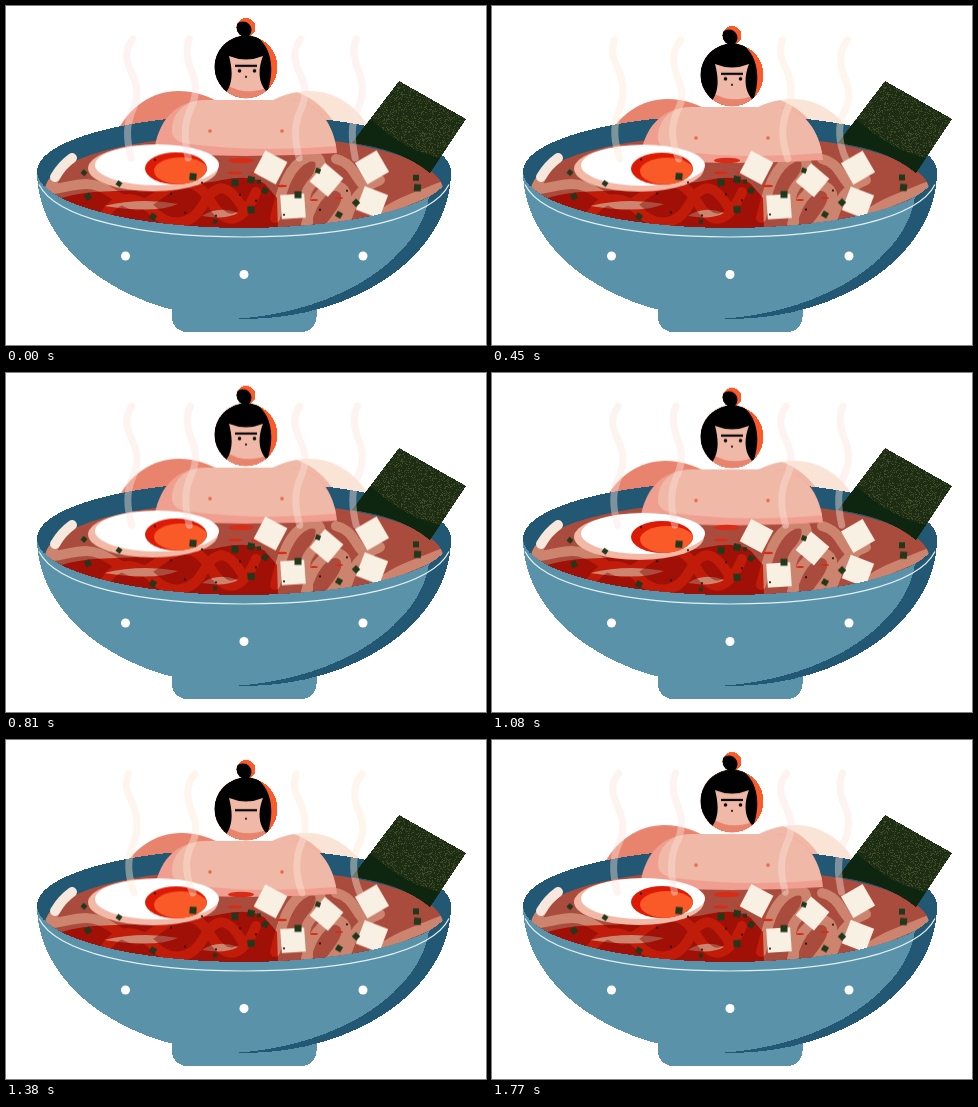
An HTML page that plays this animation: 480x339 px, repeating every 1800 ms.

```html
<!DOCTYPE html>
<html lang="en">
<head>
<meta charset="utf-8">
<title>Ramen bath</title>
<style>
html, body { margin: 0; width: 100%; height: 100%; overflow: hidden; background: #fff; }
svg { display: block; width: 100vw; height: 100vh; }
.crisp { shape-rendering: crispEdges; }
.oil { mix-blend-mode: multiply; }

.bob { animation: bob 900ms cubic-bezier(.37, 0, .63, 1) infinite; }
.chest { --y: 7px; }
.head { --y: 8px; }
.arm { --x: 3px; --y: 8px; }
.float { --y: 3px; animation-delay: -210ms; }
.crumb { --y: 1.2px; animation-delay: -250ms; }
@keyframes bob { 50% { transform: translate(var(--x, 0px), var(--y)); } }

.brow { animation: brow 1800ms infinite; }
.eyes { animation: blink 1800ms step-end infinite; }
@keyframes brow { 0%, 72% { transform: none; } 75%, 78% { transform: translateY(2.5px); } 81%, 100% { transform: none; } }
@keyframes blink { 0% { opacity: 1; } 74% { opacity: 0; } 79% { opacity: 1; } }

.steam path {
  fill: none; stroke-width: 7; stroke-linecap: round; stroke-opacity: .42;
  animation: 900ms cubic-bezier(.37, 0, .63, 1) -840ms infinite;
}
.steam .a { animation-name: swayA; }
.steam .b { animation-name: swayB; }
@keyframes swayA {
  0%, 100% { stroke: #fae2df; d: path("M127 33C119 43 119 52 125 66C132 80 133 90 127 103C120 118 120 132 125 152"); }
  50% { stroke: #fde6d4; d: path("M122 34C119 46 120 50 126 62C133 78 133 92 126 107C121 122 122 135 128 153"); }
}
@keyframes swayB {
  0%, 100% { stroke: #fae2df; d: path("M183 33C179 43 181 54 186 66C192 80 190 92 184 104C178 118 178 132 182 152"); }
  50% { stroke: #fde6d4; d: path("M189 34C180 44 180 56 185 70C191 84 192 93 185 106C179 119 179 135 187 153"); }
}
</style>
</head>
<body>
<svg viewBox="0 0 480 339" preserveAspectRatio="none">
  <defs>
    <clipPath id="rim"><ellipse cx="238" cy="165.500" rx="207" ry="56.500"/></clipPath>
    <clipPath id="soup" clip-path="url(#rim)"><ellipse cx="238" cy="184" rx="199" ry="55"/></clipPath>
    <path id="arm" d="M108 132C122 99 148 85 172 85C190 85 204 91 214 97V142H108Z"/>
    <clipPath id="armShape"><use href="#arm"/></clipPath>
    <clipPath id="yolk"><ellipse cx="170" cy="161" rx="31" ry="16"/></clipPath>
    <clipPath id="skull"><circle cx="240" cy="61" r="31.5"/></clipPath>
    <clipPath id="knot"><circle cx="240" cy="21.5" r="9.5"/></clipPath>
    <path id="sheet" d="M393 75L460 113L424 167Q395 143 346 137Z"/>
    <clipPath id="sheetShape"><use href="#sheet"/></clipPath>
  </defs>

  <!-- arms, behind the bowl's back rim -->
  <use href="#arm" class="bob arm" fill="#e8846e"/>
  <g transform="matrix(-1 0 0 1 476 0)">
    <g class="bob arm">
      <use href="#arm" fill="#fae4d6"/>
      <g clip-path="url(#armShape)"><use href="#arm" x="33" y="-2" fill="#f0b8a6"/></g>
    </g>
  </g>

  <!-- back of the bowl and broth -->
  <ellipse class="crisp" cx="238" cy="165.500" rx="207" ry="56.500" fill="#225873"/>
  <g clip-path="url(#soup)">
    <rect x="30" y="110" width="420" height="120" fill="#aa4c3d"/>
    <g fill="none" stroke="#cd846e" stroke-width="10" stroke-linecap="round">
      <path d="M66 152Q53 160 43 184C70 180 82 172 104 186S130 206 151 190S188 168 205 196S238 214 250 186"/>
      <path d="M95 216C112 182 134 192 148 206S184 222 197 199S222 176 238 204"/>
      <path d="M269 212C276 184 281 160 302 151C318 147 319 164 304 180C294 193 303 202 302 217"/>
      <path d="M300 219C306 190 326 171 338 184C346 195 332 210 324 221"/>
      <path d="M330 153C350 158 348 174 362 183"/>
      <path d="M374 174C354 182 346 194 340 215"/>
      <path d="M372 212C388 197 412 191 440 179"/>
    </g>
  </g>
  <path d="M66 152Q56 159 49 171" fill="none" stroke="#f6e8dc" stroke-width="10" stroke-linecap="round"/>

  <!-- seaweed -->
  <use href="#sheet" class="crisp" fill="#1d2d13"/>
  <g clip-path="url(#sheetShape)">
    <path id="grain" fill="#3d4a25"/>
    <path d="M364 113Q401 146 435 152L424 170L340 142Z" fill="#0e260f"/>
  </g>

  <!-- bather -->
  <g class="bob chest">
    <path d="M148 147C151 116 169 94 200 94H284C311 94 328 117 331 147Q240 153 148 147Z" fill="#f09e90"/>
    <path d="M166 123C167 105 180 94 200 94H284C309 94 325 114 330 140Q255 147 183 138Q165 136 166 123Z" fill="#f0b8a6"/>
    <g fill="#e66c45"><circle cx="204" cy="125" r="1.8"/><circle cx="276" cy="125" r="1.8"/></g>
  </g>
  <g class="bob head">
    <circle class="crisp" cx="240" cy="21.500" r="9.500" fill="#fc5a29"/>
    <circle cx="237" cy="24" r="8.500" clip-path="url(#knot)"/>
    <ellipse cx="239" cy="33" rx="7" ry="3"/>
    <circle class="crisp" cx="240" cy="61" r="31.500" fill="#fc5a29"/>
    <g clip-path="url(#skull)">
      <path d="M219 45H261L262 95H215Z" fill="#e8846e"/>
      <path d="M222 45H258L262 81Q240 91 219 78Z" fill="#f0b8a6"/>
      <path d="M205 28H246C263 36 270 58 262 84L260 85C252 76 252 63 257 50Q240 57 223 50C227 65 227 78 219 88L205 88Z"/>
      <path d="M261 85L275 94H255Z" fill="#fff"/>
    </g>
    <g transform="translate(0 -1.2)">
      <path class="brow" d="M229 61H251" stroke="#000" stroke-width="2.200"/>
      <g class="eyes"><circle cx="233.500" cy="66" r="1.8"/><circle cx="248.500" cy="66" r="1.8"/></g>
      <circle cx="240" cy="72" r="1"/>
    </g>
  </g>

  <!-- chili oil -->
  <g class="oil" clip-path="url(#soup)" fill="#f03415">
    <path fill-rule="evenodd" d="M52 193C90 181 120 188 151 181S196 179 216 174Q246 168 259 178L271 192L272 224H150Q95 215 52 193ZM98 200Q135 191 172 198Q150 208 98 200ZM196 210Q212 199 232 207Q220 214 196 210Z"/>
  </g>
  <g fill="#d92c17">
    <ellipse cx="235" cy="154.500" rx="13" ry="2.800"/>
    <ellipse cx="254" cy="167" rx="9" ry="1.800"/>
    <ellipse cx="229" cy="167" rx="7" ry="1.600"/>
    <ellipse cx="333" cy="192" rx="4" ry="1"/>
    <ellipse cx="308" cy="194" rx="4" ry="1"/>
    <ellipse cx="276" cy="180" rx="5" ry="1.200"/>
  </g>

  <!-- toppings -->
  <g class="bob float">
    <ellipse cx="147" cy="161" rx="65" ry="23" fill="#f1b9a6"/>
    <ellipse cx="151" cy="157.500" rx="62" ry="20.500" fill="#fff"/>
    <g clip-path="url(#yolk)">
      <rect x="135" y="140" width="70" height="40" fill="#dd1a05"/>
      <ellipse cx="175" cy="163.500" rx="27" ry="13.500" fill="#fa5a28"/>
    </g>
  </g>
  <g id="tofu" class="bob float" fill="#f8f0e2"></g>
  <g id="herbs" class="bob crumb" fill="#20381b"></g>

  <!-- front of the bowl -->
  <rect class="crisp" x="166" y="280" width="144.500" height="46" rx="15" fill="#5a93a9"/>
  <path class="crisp" d="M31 165.500A207 147.500 0 0 0 445 165.500A207 56.500 0 0 1 31 165.500Z" fill="#5a93a9"/>
  <path class="crisp" d="M423 191C415 249 338 306 228 313H238A207 147.500 0 0 0 445 165.500Q444 178 423 191Z" fill="#225873"/>
  <path d="M33 178.500C50 213 135 231 238 231S426 213 443 178.500" fill="none" stroke="#e4eff3" stroke-width="1.200"/>
  <g fill="#fff"><circle cx="119.500" cy="250" r="4.500"/><circle cx="238" cy="268.500" r="4.500"/><circle cx="357" cy="250" r="4.500"/></g>

  <g class="steam">
    <path class="a"/>
    <path class="b"/>
    <g transform="translate(168)"><path class="a"/></g>
    <g transform="translate(167)"><path class="b"/></g>
  </g>
</svg>
<script>
const byId = id => document.getElementById(id);
const square = ([x, y, size, turn]) =>
  `<rect x="${-size / 2}" y="${-size / 2}" width="${size}" height="${size}" transform="translate(${x} ${y}) rotate(${turn})"/>`;

byId("tofu").innerHTML = [
  [264.5, 160, 25, 28], [320.5, 172.5, 24, 40], [366, 160, 25, -30],
  [366, 195, 25, 21], [287, 199, 24, -4]
].map(square).join("");

const leaves = [
  [78, 166, 5, 40], [113, 177, 5, 35], [82, 190, 6, -25], [147, 210, 6, 30],
  [187, 170, 7, 5], [229, 176, 7, 0], [245, 173, 7, 10], [253, 175, 4, 0],
  [259, 184, 6, 30], [245, 203, 7, -5], [209, 215, 4, 20], [292, 188, 7, 0],
  [312, 164, 5, 20], [333, 208, 6, 30], [350, 196, 6, 45], [410, 171, 6, 0], [411.5, 181, 7, 5]
];
const dots = [
  [196, 176], [234, 188], [250, 194], [165, 187], [179, 206],
  [210, 209], [278, 208], [314, 203], [341, 184], [149, 153]
];
byId("herbs").innerHTML = leaves.map(square).join("") +
  dots.map(([x, y]) => `<circle cx="${x}" cy="${y}" r="1.1" fill="#160a06"/>`).join("");

// Seeded grain for the seaweed sheet
let seed = 7;
const random = () => (seed = seed * 16807 % 2147483647) / 2147483647;
let grain = "";
for (let i = 0; i < 2600; i++) {
  grain += `M${345 + Math.floor(random() * 116)} ${74 + Math.floor(random() * 94)}h1v1h-1z`;
}
byId("grain").setAttribute("d", grain);
</script>
</body>
</html>
```
